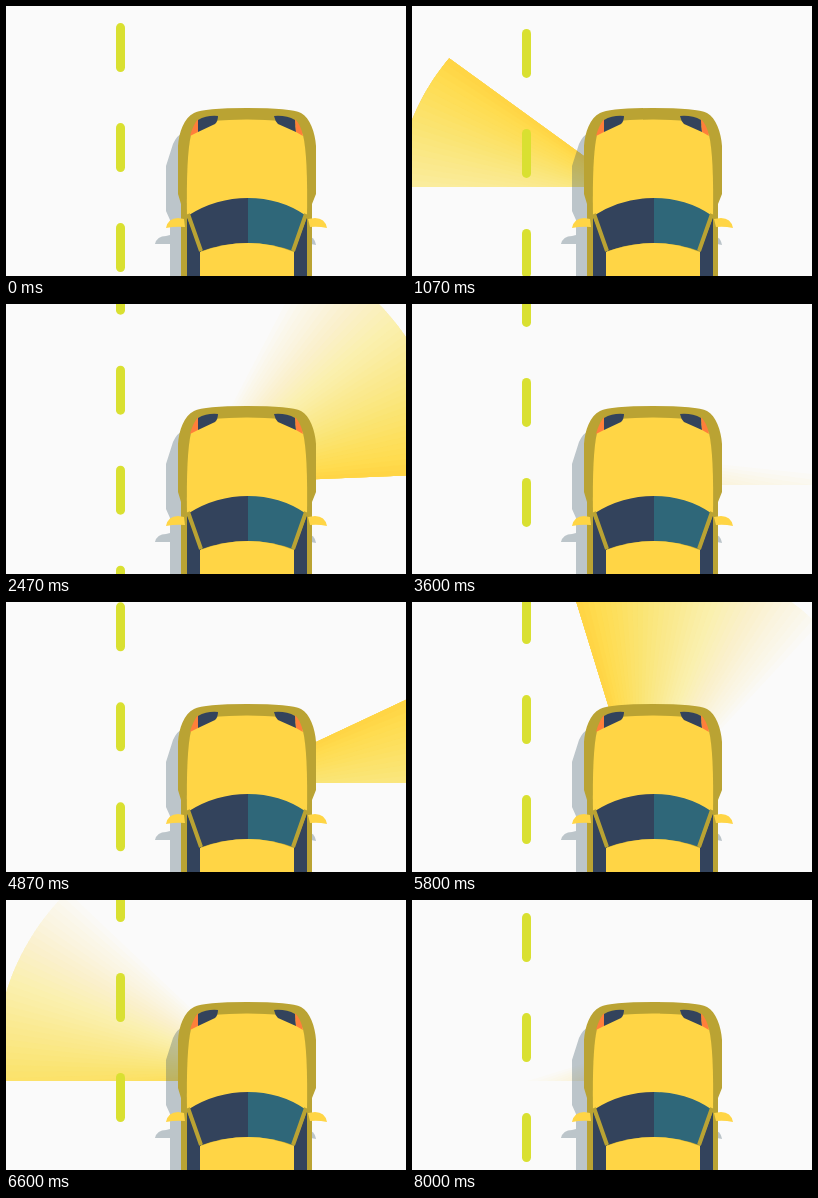
These frames come from a looping animation (400x270 px, 8070 ms). An HTML page:

```html
<!DOCTYPE html>
<html lang="en">
<head>
<meta charset="utf-8">
<title>Car radar sweep</title>
<style>
  html, body { margin: 0; width: 100%; height: 100%; overflow: hidden; background: #fafafa; }
  svg { display: block; width: 100vw; height: 100vh; }
</style>
</head>
<body>
<svg viewBox="0 0 400 270">
  <defs>
    <clipPath id="ahead"><rect width="400" height="181"/></clipPath>
  </defs>
  <rect width="400" height="270" fill="#fafafa"/>
  <g id="beam" fill="#ffd545" clip-path="url(#ahead)"></g>
  <g id="lane" fill="#d9e031"></g>

  <g id="shadow" fill="#385464" fill-opacity=".32">
    <path d="M164 270V238H149Q151 230 160 230L164 229V214L160 205V160L167 138Q171 129 178 126H200V270Z"/>
    <path d="M305 231Q309 233 310 239L305 238Z"/>
  </g>

  <g id="car">
    <path fill="#baa333" d="M175 270V198L172 188V140C173 126 178 112 188 107Q198 102 241 102Q285 102 295 107C304 112 309 126 310 140V188L306 198V270Z"/>
    <path fill="#ffd545" d="M181 212Q180 150 185 129Q190 117 205 115Q241 112 277 115Q292 117 297 129Q302 150 301 212Z"/>
    <path fill="#33435c" d="M192 114Q201 109 212 110Q212 115 209 118L192 126Z"/>
    <path fill="#33435c" d="M289 114Q280 109 268 110Q269 115 272 118L290 126Z"/>
    <path fill="#ff7f3a" d="M192 113V126L184 130Q187 119 192 113ZM289 113L290 126L297 130Q295 119 289 113Z"/>
    <path fill="#33435c" d="M181 211L195 246V270H181ZM301 211L288 246V270H301Z"/>
    <path fill="#33435c" d="M183 209Q210 192 242 192V237Q218 237 196 245Z"/>
    <path fill="#2f6779" d="M299 209Q274 192 242 192V237Q265 237 287 245Z"/>
    <path fill="#ffd545" d="M194 270V246Q218 237 242 237Q265 237 288 246V270Z"/>
    <path fill="none" stroke="#baa333" stroke-width="4" d="M182 208L195 245M300 208L287 245"/>
    <path fill="#ffd545" d="M160 222Q162 212 172 212L178 213L179 221Q170 220 160 222ZM321 222Q319 212 309 212L302 213L304 221Q312 220 321 222Z"/>
  </g>
</svg>
<script>
const LOOP = 8070, SWEEP = 4000, RETURN_AT = 3970;
const PIVOT = { x: 218, y: 181 };
const LAYERS = 40, SPREAD = 60;
const NS = 'http://www.w3.org/2000/svg';

function add(parent, tag, attrs) {
  const el = document.createElementNS(NS, tag);
  for (const key in attrs) el.setAttribute(key, attrs[key]);
  return parent.appendChild(el);
}

const beam = document.getElementById('beam');
const lane = document.getElementById('lane');

// Nested fans, widest first: together their opacity rises evenly towards the leading edge.
const fans = Array.from({ length: LAYERS }, (_, i) =>
  add(beam, 'path', { 'fill-opacity': 1 / (LAYERS - i) }));

for (let i = 0; i < 4; i++) {
  add(lane, 'rect', { x: 110, y: (i - 1) * 100, width: 9, height: 49, rx: 4.5 });
}

const clamp01 = v => Math.max(0, Math.min(1, v));
const easeInOut = u => u < 0.5 ? 2 * u * u : 1 - 2 * (1 - u) * (1 - u);

// s runs from 0 at the leading ray to 1 at the faded one.
// dir 1 turns clockwise from the left, -1 counterclockwise from the right.
function ray(lead, s, dir) {
  const a = (lead - s * SPREAD) * Math.PI / 180;
  const shift = 2 + 28 * s;
  const reach = 222 + 22 * s;
  const point = r => {
    const x = -r * Math.cos(a) - shift * Math.sin(a);
    const y = -r * Math.sin(a) + shift * Math.cos(a);
    return (PIVOT.x + dir * x).toFixed(2) + ' ' + (PIVOT.y + y).toFixed(2);
  };
  return { base: point(0), tip: point(reach) };
}

function drawBeam(lead, dir) {
  const rays = Array.from({ length: LAYERS + 1 }, (_, i) => ray(lead, i / LAYERS, dir));
  fans.forEach((fan, i) => {
    const part = rays.slice(0, LAYERS - i + 1);
    const tips = part.map(r => r.tip);
    const bases = part.map(r => r.base).reverse();
    fan.setAttribute('d', 'M' + tips.concat(bases).join('L') + 'Z');
  });
}

function draw(t) {
  const travel = 17 + 0.0988 * t + 8.75e-8 * t * t;
  lane.setAttribute('transform', `translate(0 ${(travel % 100).toFixed(2)})`);

  if (t < RETURN_AT) {
    drawBeam(251 * easeInOut(clamp01(t / SWEEP)), 1);
  } else {
    drawBeam(-1 + 258 * easeInOut(clamp01((t - RETURN_AT) / SWEEP)), -1);
  }
}

const start = performance.now();
function tick() {
  draw((performance.now() - start) % LOOP);
  requestAnimationFrame(tick);
}
draw(0);
requestAnimationFrame(tick);
</script>
</body>
</html>
```
